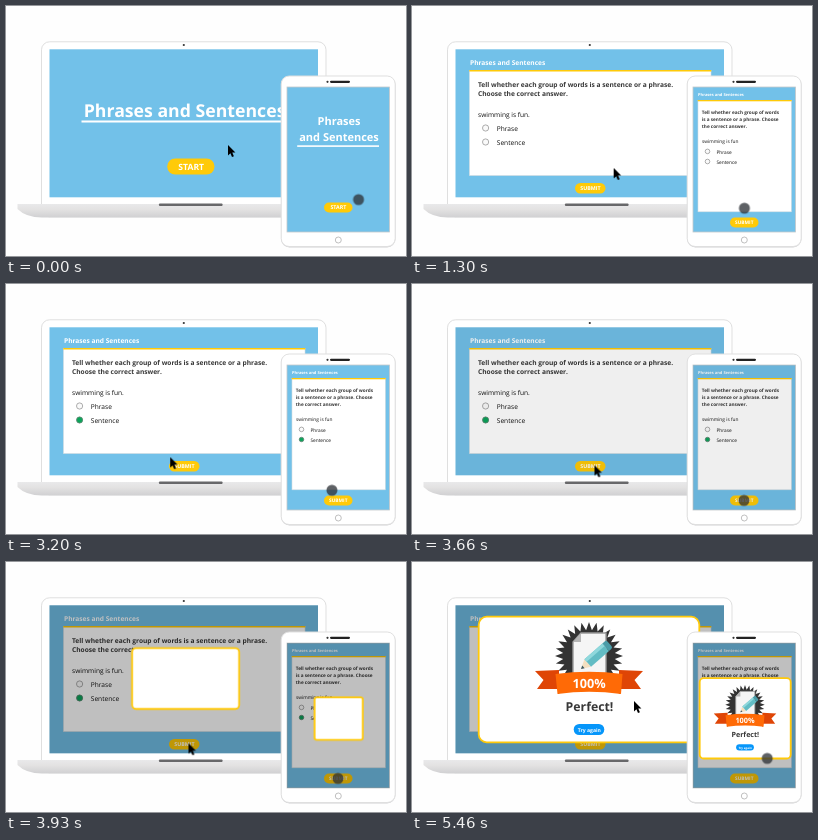
These frames come from a looping animation (400x250 px, 6260 ms). An HTML page:

```html
<!DOCTYPE html>
<html lang="en">
<head>
<meta charset="utf-8">
<title>Phrases and Sentences</title>
<style>
html, body { margin: 0; width: 100%; height: 100%; overflow: hidden; background: #fefefe; }
svg { display: block; width: 100vw; height: 100vh; }
text { font-family: "Open Sans", "Noto Sans", sans-serif; text-rendering: geometricPrecision; }
.b { font-weight: 700; }
.m { text-anchor: middle; }
.w { fill: #fff; }
.ink { fill: #383838; }
.body { fill: #111; font-weight: 500; }
.blue { fill: #72c1e9; }
.btn { fill: #ffca08; }
.edge { fill: #fff; stroke: #dfdfdf; }
.radio { fill: #fafafa; stroke: #999; stroke-width: .8; }
.dot { fill: #0aa55a; stroke: #4f8a6c; stroke-width: .7; }
.touch { fill: rgba(45, 50, 55, .77); }
.frame { fill: #fff; stroke: #ffc90a; stroke-width: 1.8; vector-effect: non-scaling-stroke; }

.start, .quiz, .dot, .dim, .pop, .award, .mouse, .touch {
  animation: 6260ms linear infinite;
}
.start { animation-name: leave; }
.quiz { animation-name: enter; }
.dot { animation-name: pick; }
.dim { animation-name: dim; }
.pop { animation-name: pop; }
.award { animation-name: award; }
.mouse { animation-name: mouse; }
.touch { animation-name: touch; }

@keyframes leave {
  0%, 20.75% { visibility: visible; }
  20.751%, 100% { visibility: hidden; }
}
@keyframes enter {
  0%, 20.75% { opacity: 0; }
  20.751%, 100% { opacity: 1; }
}
@keyframes pick {
  0%, 40.398% { opacity: 0; }
  40.399%, 100% { opacity: 1; }
}
@keyframes dim {
  0% { opacity: 0; }
  58.45% { opacity: 0; animation-timing-function: steps(4, start); }
  61.965%, 100% { opacity: .25; }
}
@keyframes pop {
  0% { transform: scale(0); animation-timing-function: step-end; }
  59.984% { transform: scale(var(--s)); animation-timing-function: steps(7, end); }
  66.438%, 100% { transform: scale(1); }
}
@keyframes award {
  0% { opacity: 0; }
  64.601% { opacity: 0; animation-timing-function: steps(3, start); }
  67.348%, 100% { opacity: 1; }
}
@keyframes mouse {
  0% { transform: translate(222px, 139px); }
  13.722% { transform: translate(222px, 139px); animation-timing-function: steps(6, start); }
  19.473% { transform: translate(201.7px, 162px); }
  31.294% { transform: translate(201.7px, 162px); animation-timing-function: steps(5, start); }
  36.086% { transform: translate(72.8px, 132.8px); }
  47.268% { transform: translate(72.8px, 132.8px); animation-timing-function: steps(6, start); }
  53.019% { transform: translate(182.5px, 181.2px); }
  82.412% { transform: translate(182.5px, 181.2px); animation-timing-function: steps(6, start); }
  88.163%, 100% { transform: translate(222px, 139px); }
}
@keyframes touch {
  0% { transform: translate(352.5px, 193.6px); }
  13.722% { transform: translate(352.5px, 193.6px); animation-timing-function: steps(6, start); }
  19.473% { transform: translate(332.4px, 202.2px); }
  31.294% { transform: translate(332.4px, 202.2px); animation-timing-function: steps(5, start); }
  36.086% { transform: translate(295.6px, 155.6px); }
  47.268% { transform: translate(295.6px, 155.6px); animation-timing-function: steps(6, start); }
  53.019% { transform: translate(332px, 216.4px); }
  82.412% { transform: translate(332px, 216.4px); animation-timing-function: steps(6, start); }
  88.163%, 100% { transform: translate(355.2px, 196.4px); }
}
</style>
</head>
<body>
<svg viewBox="0 0 400 250" preserveAspectRatio="none">
  <defs>
    <linearGradient id="metal" x2="0" y2="1">
      <stop offset="0" stop-color="#e9e9ea"/>
      <stop offset=".4" stop-color="#e3e2e2"/>
      <stop offset="1" stop-color="#d0d0d2"/>
    </linearGradient>
    <!-- Award, centred on the burst -->
    <g id="award">
      <path id="burst" fill="#333"/>
      <path d="M-8-23H17V18H-16V-14Z" fill="#f5f5f5" stroke="#999" stroke-width="1.4"/>
      <path d="M-8-23V-14H-16Z" fill="#b5b5b5"/>
      <g transform="translate(-8 13) rotate(-41.5)">
        <path d="M0 0L9-5V5Z" fill="#f3dfc0"/>
        <path d="M0 0L3.2-1.8V1.8Z" fill="#3b5560"/>
        <path d="M9-5H33V5H9Z" fill="#62bcc4"/>
        <path d="M9-5H33V-1.6H9Z" fill="#8fd8dc"/>
        <path d="M33-5H36Q38-5 38-3V3Q38 5 36 5H33Z" fill="#4a9ca8"/>
      </g>
      <g fill="#df4506">
        <path id="tail" d="M-54 15L-30 14V33L-52 33L-45.500 24Z"/>
        <use href="#tail" transform="scale(-1 1)"/>
      </g>
      <path d="M-31 38L-22 33H-31ZM31 38L22 33H31Z" fill="#a83200"/>
      <path d="M-33.500 18Q0 13.500 33.500 18L32 38Q0 33.500-31.500 38Z" fill="#ff6a06"/>
      <text class="b m w" y="32" font-size="12.7">100%</text>
      <text class="b m ink" x=".5" y="55" font-size="12.3">Perfect!</text>
      <rect x="-15.300" y="68" width="30.600" height="11" rx="5.500" fill="#0696fa"/>
      <text class="b m w" x=".3" y="75.600" font-size="5.100">Try again</text>
    </g>
  </defs>

  <!-- Laptop -->
  <rect class="edge" x="35.500" y="35.800" width="284.500" height="175" rx="8"/>
  <path d="M11.500 198H345V203Q335 211.500 320 211.500H36Q20 211.500 11.500 203Z" fill="url(#metal)"/>
  <rect x="153" y="197.500" width="63.500" height="2.500" rx=".8" fill="#68686a"/>
  <circle cx="177.800" cy="39" r="1.100" fill="#333"/>
  <rect class="blue" x="43.500" y="43.300" width="268.500" height="148"/>

  <g class="start">
    <text class="b m w" x="178.600" y="110.600" font-size="17.700">Phrases and Sentences</text>
    <rect class="w" x="75.500" y="114.500" width="206" height="2"/>
    <rect class="btn" x="161.200" y="152.500" width="47.300" height="16" rx="8"/>
    <text class="b m w" x="185.200" y="163.700" font-size="8.600">START</text>
  </g>
  <g class="quiz">
    <text class="b w" x="58" y="59.200" font-size="6.600">Phrases and Sentences</text>
    <rect class="w" x="57.500" y="64.500" width="241.500" height="105" stroke="#d5dde0" stroke-width=".6"/>
    <rect class="btn" x="57.300" y="64" width="242" height="1.500"/>
    <g class="b ink" font-size="6.630">
      <text x="66" y="80.700">Tell whether each group of words is a sentence or a phrase.</text>
      <text x="66" y="90">Choose the correct answer.</text>
    </g>
    <g class="body" font-size="6.600">
      <text x="66" y="110.600">swimming is fun.</text>
      <text x="84.800" y="124.700">Phrase</text>
      <text x="84.800" y="138.700">Sentence</text>
    </g>
    <circle class="radio" cx="73.600" cy="122" r="3.100"/>
    <circle class="radio" cx="73.600" cy="136" r="3.100"/>
    <circle class="dot" cx="73.600" cy="136" r="2.900"/>
    <rect class="btn" x="163" y="177" width="30.500" height="10.500" rx="5.250"/>
    <text class="b m w" x="178.400" y="184.200" font-size="5.300">SUBMIT</text>
  </g>
  <rect class="dim" x="43.500" y="43.300" width="268.500" height="148"/>
  <g class="pop" style="--s:.099; transform-origin:182px 115.600px">
    <rect class="frame" x="66.700" y="54.700" width="220.600" height="125.600" rx="8"/>
  </g>
  <g class="award"><use href="#award" x="177" y="94"/></g>
  <path class="mouse" d="M0 0V10.400L2.400 8.200L4 12L5.900 11.200L4.300 7.500H7.400Z"/>

  <!-- Tablet -->
  <rect x="275" y="70.600" width="114.500" height="171" rx="8.500" fill="#cfcfd1"/>
  <rect class="edge" x="275.200" y="70" width="114" height="170.500" rx="8"/>
  <rect x="324" y="74.700" width="20" height="2.200" rx="1.100" fill="#222"/>
  <circle cx="321.500" cy="75.800" r="1.100" fill="#333"/>
  <circle cx="332.300" cy="234" r="3" fill="#fff" stroke="#b0b0b0" stroke-width=".8"/>
  <rect class="blue" x="281" y="81" width="102.500" height="145" stroke="#c4c8ca" stroke-width=".8"/>

  <g class="start">
    <g class="b m w" font-size="11">
      <text x="333" y="118.800">Phrases</text>
      <text x="333" y="134.800">and Sentences</text>
    </g>
    <rect class="w" x="291.200" y="139.300" width="81.800" height="1.600"/>
    <rect class="btn" x="318" y="196.500" width="28.500" height="10" rx="5"/>
    <text class="b m w" x="332.300" y="203.400" font-size="5.300">START</text>
  </g>
  <g class="quiz">
    <text class="b w" x="286" y="90.200" font-size="4.020">Phrases and Sentences</text>
    <rect class="w" x="286" y="94.500" width="93.300" height="111.300" stroke="#d5dde0" stroke-width=".6"/>
    <rect class="btn" x="285.700" y="94" width="94" height="1.300"/>
    <g class="b ink" font-size="4.680">
      <text x="289.800" y="107.600">Tell whether each group of words</text>
      <text x="289.800" y="114.800">is a sentence or a phrase. Choose</text>
      <text x="289.800" y="121.900">the correct answer.</text>
    </g>
    <g class="body" font-size="4.800">
      <text x="290" y="136.800">swimming is fun</text>
      <text x="304.400" y="147.600">Phrase</text>
      <text x="304.400" y="157.600">Sentence</text>
    </g>
    <circle class="radio" cx="295.500" cy="145.400" r="2.300"/>
    <circle class="radio" cx="295.500" cy="155.500" r="2.300"/>
    <circle class="dot" cx="295.500" cy="155.500" r="2.100"/>
    <rect class="btn" x="318" y="211.500" width="28.500" height="10" rx="5"/>
    <text class="b m w" x="332.300" y="218.300" font-size="4.800">SUBMIT</text>
  </g>
  <rect class="dim" x="281" y="81" width="102.500" height="145"/>
  <g class="pop" style="--s:.177; transform-origin:332px 157px">
    <rect class="frame" x="287.700" y="116.200" width="91" height="80.300" rx="4"/>
  </g>
  <g class="award"><use href="#award" transform="translate(333 142.700) scale(.58)"/></g>
  <circle class="touch" r="5.500"/>
</svg>
<script>
const spikes = 28;
const points = Array.from({ length: spikes * 2 }, (_, i) => {
  const r = i % 2 ? 26 : 34;
  const a = i * Math.PI / spikes - Math.PI / 2;
  return (r * Math.cos(a)).toFixed(2) + " " + (r * Math.sin(a)).toFixed(2);
});
document.getElementById("burst").setAttribute("d", "M" + points.join("L") + "Z");
</script>
</body>
</html>
```
